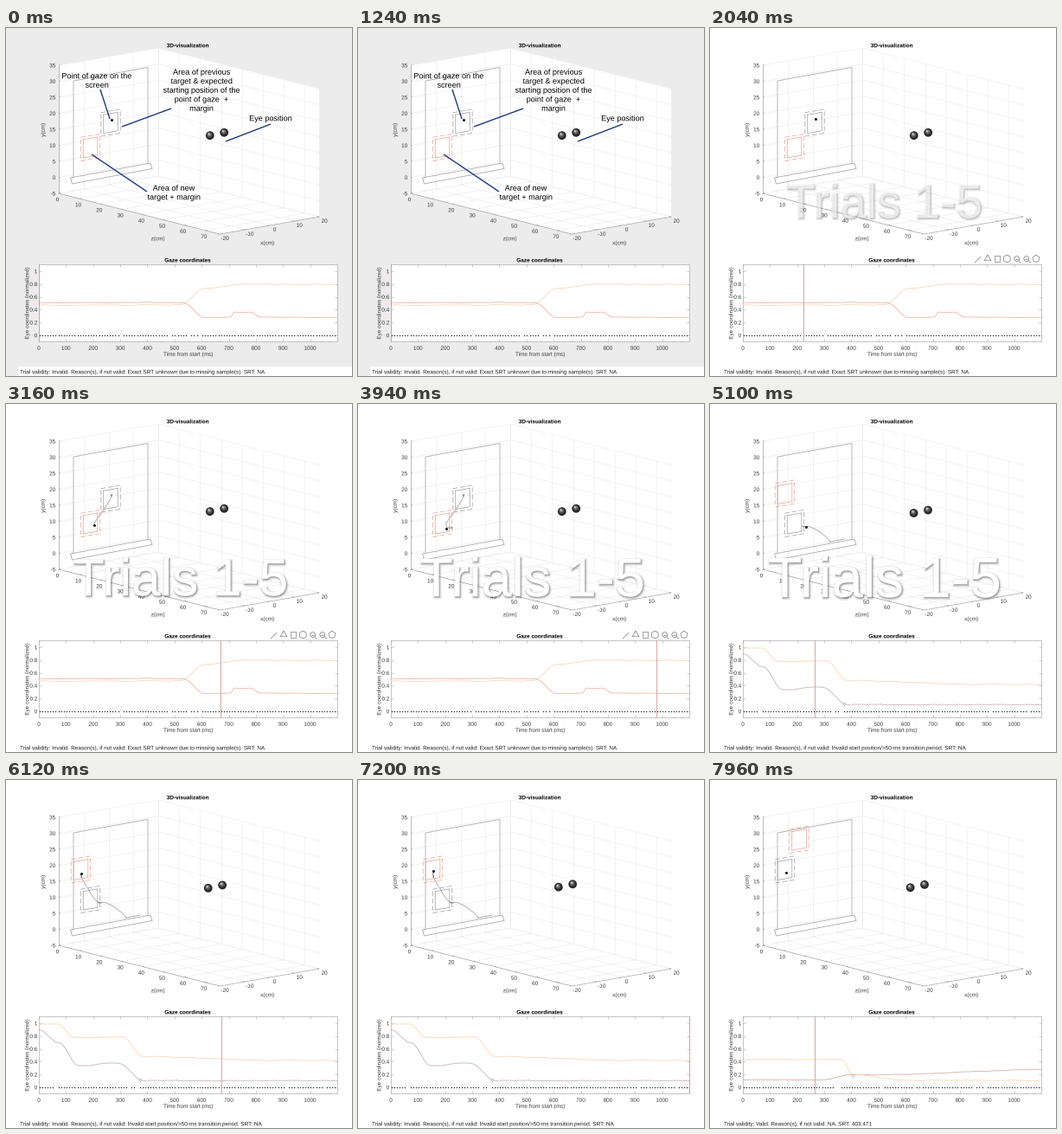
Recreate the animation shown at these times as a matplotlib script. Size 400 by 402 pixels, loop 8000 ms.

```python
import matplotlib.pyplot as plt
import numpy as np
from matplotlib.animation import FuncAnimation
from matplotlib.collections import LineCollection
from matplotlib.patches import PathPatch, Polygon, Rectangle
from matplotlib.path import Path
from matplotlib.textpath import TextPath
from matplotlib.transforms import Affine2D

W, H, DPI = 400, 402, 64
STEP, LOOP = 20, 8000
PT = 72 / DPI                      # points per pixel
GRAY = "#ececec"
SPAN = 1100                        # recorded ms per trial
RATE = SPAN / 2766                 # recorded ms per played ms
SLOPE = -0.174                     # tilt of the left wall

fig = plt.figure(figsize=(W / DPI, H / DPI), dpi=DPI)
ax = fig.add_axes([0, 0, 1, 1])
ax.set_xlim(0, W)
ax.set_ylim(H, 0)
ax.axis("off")


# ---- drawing helpers ----------------------------------------------------
def glyphs(s, weight="normal"):
    return TextPath((0, 0), s, size=100,
                    prop={"family": "Liberation Sans", "weight": weight})


def words(x, y, s, size=6.4, ha="center", weight="normal", angle=0):
    """Outline of one line of text, vertically centred on y."""
    path = glyphs(s, weight)
    box = path.get_extents()
    shift = {"left": 0, "center": (box.x0 + box.x1) / 2, "right": box.x1}[ha]
    return (Affine2D().translate(-shift, -36).scale(size / 100, -size / 100)
            .rotate_deg(angle).translate(x, y).transform_path(path))


def ink(paths, color, z=1):
    return ax.add_patch(PathPatch(Path.make_compound_path(*paths), lw=0,
                                  facecolor=color, zorder=z, snap=False))


def segments(segs, color, lw, z=1):
    return ax.add_collection(
        LineCollection(segs, colors=color, linewidths=lw * PT, zorder=z))


def line(color, lw, z, **kw):
    return ax.plot([], [], color=color, lw=lw * PT, zorder=z, **kw)[0]


labels = []                        # all small dark text

# ---- 3D box -------------------------------------------------------------
ZMAX = 76.9


def project(x, y, z):
    """x, y, z in cm to stage pixels."""
    return (118.5 + 2.875 * x + 2.42 * z,
            162.6 - 0.5 * x + 0.611 * z - 3.7 * y)


def edge(a, b):
    return [project(*a), project(*b)]


backdrop = ax.add_patch(Rectangle((0, 0), W, H, color=GRAY, lw=0, zorder=0))
ax.add_patch(Rectangle((14, 391), W - 14, 11, color="white", lw=0, zorder=0.1))
ax.add_patch(Polygon([project(-20, 35, 0), project(20, 35, 0),
                      project(20, 35, ZMAX), project(20, -5, ZMAX),
                      project(-20, -5, ZMAX), project(-20, -5, 0)],
                     closed=True, facecolor="white", edgecolor="none",
                     zorder=0.2))

grid = []
axes3d = [edge((-20, -5, 0), (-20, 35, 0)),
          edge((-20, -5, 0), (-20, -5, ZMAX)),
          edge((-20, -5, ZMAX), (20, -5, ZMAX))]


def tick3d(point, tick, offset, value, ha="center"):
    px, py = project(*point)
    axes3d.append([(px, py), (px + tick, py - 0.4)])
    labels.append(words(px + offset[0], py + offset[1], str(value), ha=ha))


for y in range(-5, 36, 5):
    grid += [edge((-20, y, 0), (20, y, 0)), edge((20, y, 0), (20, y, ZMAX))]
    tick3d((-20, y, 0), 2, (-4, 0), y, "right")
for x in range(-20, 21, 10):
    grid += [edge((x, -5, 0), (x, 35, 0)), edge((x, -5, 0), (x, -5, ZMAX))]
    tick3d((x, -5, ZMAX), -2, (6, 4.5), x)
for z in range(0, 71, 10):
    grid += [edge((20, -5, z), (20, 35, z)), edge((-20, -5, z), (20, -5, z))]
    tick3d((-20, -5, z), 2, (-1.5, 6.8), z)
segments(grid, "#eeeeee", 0.7, 0.5)
segments(axes3d, "#9a9a9a", 0.6)
labels += [words(175.5, 243, "z(cm)"), words(302, 248, "x(cm)"),
           words(42.5, 118, "y(cm)", angle=-90)]

# screen and its foot
segments([[(78, 173), (78, 61), (164, 45.5), (164, 157)],
          [(74.5, 173), (167, 156), (169, 162.5), (76.5, 180), (74.5, 173)]],
         "#a6a6a6", 0.8, 2)

# ---- gaze plot ----------------------------------------------------------
LEFT, RIGHT, TOP, BOTTOM = 38, 383, 272.5, 362


def plot_x(ms):
    return LEFT + ms * (RIGHT - LEFT) / SPAN


def plot_y(v):
    return 355 - 74 * v


ax.add_patch(Rectangle((LEFT, TOP), RIGHT - LEFT, BOTTOM - TOP,
                       facecolor="white", edgecolor="#adadad",
                       lw=0.7 * PT, zorder=0.4))
ticks = []
for ms in range(0, 1001, 100):
    x = plot_x(ms)
    ticks += [[(x, BOTTOM), (x, BOTTOM - 3)], [(x, TOP), (x, TOP + 3)]]
    labels.append(words(x, 369.5, str(ms)))
for k in range(6):
    y = plot_y(k / 5)
    ticks += [[(LEFT, y), (LEFT + 3, y)], [(RIGHT, y), (RIGHT - 3, y)]]
    labels.append(words(LEFT - 2, y, f"{k / 5:g}", ha="right"))
segments(ticks, "#adadad", 0.6)
labels += [words(210.5, 376.5, "Time from start (ms)"),
           words(24, 318, "Eye coordinates (normalized)", angle=-90)]
ink(labels, "#383838")
ink([words(210, 20, "3D-visualization", weight="bold"),
     words(210, 268, "Gaze coordinates", weight="bold")], "black")

# ---- trials -------------------------------------------------------------
T = np.linspace(0, SPAN, 331)
rng = np.random.default_rng(4)


def signal(base, *moves):
    """Gaze coordinate: eased moves (from ms, to ms, change) plus tremor."""
    v = np.full(T.size, float(base))
    for a, b, change in moves:
        u = np.clip((T - a) / (b - a), 0, 1)
        v += change * u * u * (3 - 2 * u)
    tremor = rng.normal(0, 0.012, T.size + 14)
    return v + np.convolve(tremor, np.ones(15) / 15, "valid")


A, B, C, D = (121, 109.5), (97.5, 138), (86.5, 103.5), (103, 69)
INVALID = "Invalid. Reason(s), if not valid: "
trials = [
    dict(shown=0, start=1480, old=A, new=B, mark=None, red="#e8b3a3",
         head=((244, 122.5), (244, 122.5)),
         x=signal(.51, (530, 610, -.23), (705, 722, .08), (780, 815, -.08)),
         y=signal(.475, (525, 610, .26), (610, 760, .06)),
         note=INVALID + "Exact SRT unknown due to missing sample(s). SRT: NA"),
    dict(shown=4250, start=4432, old=B, new=C, mark=373, red="#c8b0b0",
         head=((245, 125), (240, 122)),
         x=signal(.9, (0, 70, -.2), (75, 145, -.36), (180, 245, .035),
                  (295, 385, -.27)),
         y=signal(.985, (70, 130, -.205), (310, 385, -.3), (400, 850, -.06)),
         note=INVALID + "Invalid start position/>50-ms transition period."
                        " SRT: NA"),
    dict(shown=7210, start=7292, old=C, new=D, mark=403.5, red="#cfaca4",
         head=((239.8, 122.6), (239.8, 122.6)),
         x=signal(.115, (300, 400, .08), (500, 1100, .08)),
         y=signal(.435, (365, 405, -.235), (405, 600, -.09)),
         note="Valid. Reason(s), if not valid: NA. SRT: 403.471"),
]
for tr in trials:
    # the recorded coordinates placed on the tilted screen
    tr["gx"] = 78 + 86 * tr["x"]
    tr["gy"] = 61 + SLOPE * 86 * tr["x"] + 110 * tr["y"]
    ms = np.arange(2, SPAN, 10)
    tr["dots"] = ms[rng.random(ms.size) > 0.07]
    tr["note"] = ink([words(16, 397, "Trial validity: " + tr["note"],
                            ha="left")], "#1c1c1c")


def quad(center, hw, hh):
    dx = hw * np.array([-1, 1, 1, -1, -1])
    dy = hh * np.array([-1, -1, 1, 1, -1])
    return center[0] + dx, center[1] + SLOPE * dx + dy


targets = []
for key, color in (("old", "#a9a9a9"), ("new", "#edaa9e")):
    targets += [(key, 8.3, 10.7, line(color, 0.8, 3)),
                (key, 11.2, 13.7, line(color, 0.8, 3, linestyle=(0, (7, 3.5))))]

curve_x = line("#e8b3a3", 0.8, 3)
curve_y = line("#f5d6b2", 0.8, 3)
samples = line("#222222", 0, 3, marker="o", ms=1.4 * PT, mew=0)
mark = line("none", 0, 4, marker="o", ms=3.2 * PT, mfc="white",
            mec="#b58a86", mew=0.6 * PT)
cursor = line("#cf9f9d", 0.9, 4)
trail = line("#989898", 0.7, 4)
gaze = line("#15152c", 0, 5, marker="o", ms=3 * PT, mew=0)

# ---- eyes: stacked discs give the shading -------------------------------
F = np.linspace(0, 1, 6)
SHADE = np.column_stack([-1.2 * F, -1.8 * F])
GAP = np.array([8.2, -1.7])
eyes = ax.scatter(np.zeros(12), np.zeros(12),
                  s=np.tile((9.8 * (1 - 0.86 * F) * PT) ** 2, 2),
                  c=[str(0.15 + 0.72 * f * f) for f in F] * 2,
                  linewidths=0, zorder=5)

# ---- callouts: centre, first line, text, pointer ------------------------
callout_text, pointers = [], []
for cx, top, s, a, b in (
        (105, 55, "Point of gaze on the\nscreen", (109, 71), (120, 105)),
        (226, 50.5, "Area of previous\ntarget & expected\nstarting position of"
                    " the\npoint of gaze  +\nmargin", (191, 93), (134, 114)),
        (306, 104, "Eye position", (306, 111), (254, 131)),
        (194, 184.5, "Area of new\ntarget + margin", (163, 189), (99, 146))):
    for k, row in enumerate(s.split("\n")):
        callout_text.append(words(cx, top + 10.5 * k, row, 9.1))
    pointers.append([a, b])
callouts = [ink(callout_text, "black", 8), segments(pointers, "#1f3a80", 1.4, 8)]


# ---- plot toolbar -------------------------------------------------------
def regular(cx, cy, r, sides):
    a = np.linspace(0, 2 * np.pi, sides + 1) - np.pi / 2 + (sides == 4) * np.pi / 4
    return list(zip(cx + r * np.cos(a), cy + r * np.sin(a)))


icons = [[(306, 271), (313, 264)]]
for k, sides in enumerate((3, 4, 6, 16, 16, 5)):
    cx = 321 + 11.2 * k
    icons.append(regular(cx, 266.5, 3 if sides == 16 else 4.4, sides))
    if sides == 16:
        icons += [[(cx + 2, 268.5), (cx + 5, 271.5)],
                  [(cx - 1.5, 266.5), (cx + 1.5, 266.5)]]
toolbar = segments(icons, "#8a8a8a", 0.8, 4)

# ---- big caption --------------------------------------------------------
title = glyphs("Trials 1-5")
box = title.get_extents()
caption = []                       # (patch, shadow offset, full alpha)
for lw in np.arange(5, 0, -1):
    caption.append((PathPatch(title, facecolor="#404040", edgecolor="#404040",
                              lw=lw * PT, joinstyle="round", zorder=9),
                    1, 0.03 + 0.015 * (5 - lw)))
caption.append((PathPatch(title, facecolor="white", lw=0, zorder=10), 0, 1))
for patch, *_ in caption:
    ax.add_patch(patch)


def draw_caption(t):
    alpha = np.interp(t, [1480, 2480, 5400, 5900], [0, 1, 1, 0])
    scale = (268 - 3 * (5.9 - t / 1000) ** 2) / box.width
    for patch, offset, full in caption:
        patch.set_visible(alpha > 0)
        patch.set_alpha(alpha * full)
        patch.set_transform(
            Affine2D().translate(-(box.x0 + box.x1) / 2, -(box.y0 + box.y1) / 2)
            .scale(scale, -scale)
            .translate(201 + offset, 199.5 + 1.4 * offset) + ax.transData)


def show_trial(tr):
    for key, hw, hh, art in targets:
        art.set_data(*quad(tr[key], hw, hh))
    curve_x.set_data(plot_x(T), plot_y(tr["x"]))
    curve_x.set_color(tr["red"])
    curve_y.set_data(plot_x(T), plot_y(tr["y"]))
    samples.set_data(plot_x(tr["dots"]), np.full(tr["dots"].size, 355.4))
    mark.set_visible(tr["mark"] is not None)
    ms = tr["mark"] or 0
    mark.set_data([plot_x(ms)], [plot_y(np.interp(ms, T, tr["x"]))])
    for other in trials:
        other["note"].set_visible(other is tr)


def draw(i):
    t = i * STEP
    tr = [trial for trial in trials if t >= trial["shown"]][-1]
    show_trial(tr)
    first, waiting = tr is trials[0], t < tr["start"]
    backdrop.set_color(GRAY if waiting else "white")
    for art in callouts:
        art.set_visible(first and waiting)
    toolbar.set_visible(first and not waiting)

    ms = np.clip((t - tr["start"]) * RATE, 0, SPAN)
    cursor.set_data([plot_x(ms)] * 2, [TOP, BOTTOM])
    seen = np.searchsorted(T, ms, side="right")
    trail.set_data(tr["gx"][:seen], tr["gy"][:seen])
    gaze.set_data([np.interp(ms, T, tr["gx"])], [np.interp(ms, T, tr["gy"])])

    a, b = np.array(tr["head"])
    head = a + (b - a) * ms / SPAN
    eyes.set_offsets(np.vstack([SHADE + head - GAP, SHADE + head + GAP]))
    draw_caption(t)
    return []


anim = FuncAnimation(fig, draw, frames=LOOP // STEP, interval=STEP,
                     init_func=lambda: draw(0), repeat=True, repeat_delay=0,
                     blit=False)
plt.show()
```
